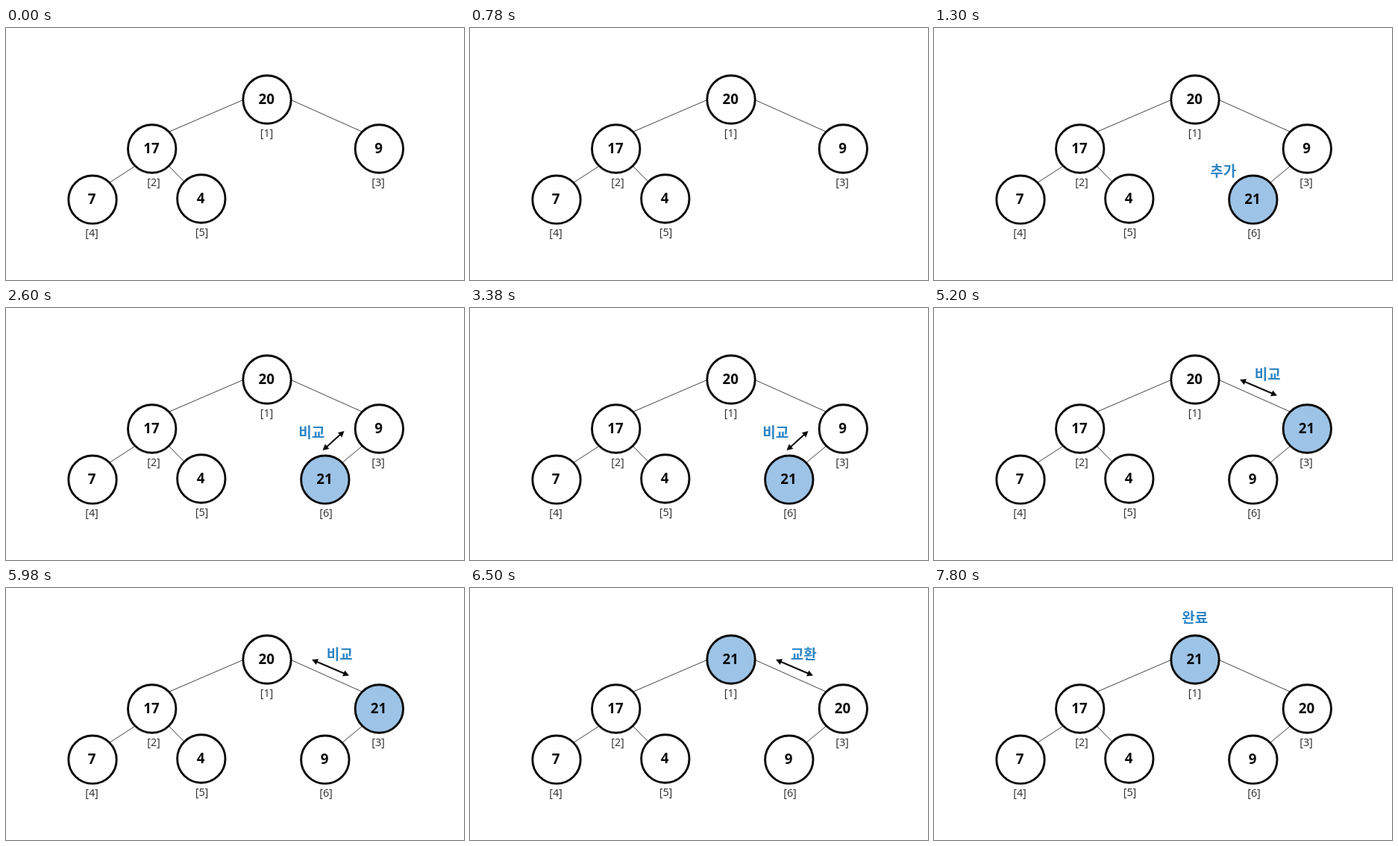
Recreate the animation shown at these times as an HTML page with a canvas. Size 614 px wide and 338 px high, loop 8 s.

```html
<!DOCTYPE html>
<html lang="ko">
<head>
<meta charset="utf-8">
<style>
html, body { margin: 0; width: 100%; height: 100%; overflow: hidden; background: #fff; }
canvas { display: block; width: 614px; height: 338px; }
</style>
</head>
<body>
<canvas></canvas>
<script>
const canvas = document.querySelector('canvas');
const ctx = canvas.getContext('2d');
const scale = window.devicePixelRatio || 1;
canvas.width = 614 * scale;
canvas.height = 338 * scale;
ctx.scale(scale, scale);
ctx.textAlign = 'center';

const STEP = 1300, LOOP = 8000, RADIUS = 32.2;
const INK = '#0a0a0a', BLUE = '#2e86c6';
const LATIN = '"Open Sans", "Noto Sans", sans-serif';
const HANGUL = '"Noto Sans CJK KR", "Noto Sans CJK", sans-serif';

// Circle centre and label x of each heap slot
const nodes = [
  [350, 96, 349.5], [195.7, 162, 198], [500.3, 162, 499],
  [116, 230.2, 115], [261.8, 229, 262.5], [427.8, 230.2, 429]
];
// Arrow ends and note position beside the edge above a slot
const hints = {
  5: { arrow: [424.5, 191, 453.5, 165], note: [410, 167] },
  2: { arrow: [410, 96, 460, 117.5], note: [447.5, 89] }
};

const parentOf = i => (i - 1) >> 1;

// Insert a value and record every step while it sifts up
function insertSteps(heap, value) {
  const steps = [{ heap: [...heap] }];
  let active = heap.push(value) - 1;
  const record = (word, { note, arrow }) =>
    steps.push({ heap: [...heap], active, word, note, arrow });

  record('추가', { note: [388, 192] });
  while (active > 0 && heap[active] > heap[parentOf(active)]) {
    const hint = hints[active], parent = parentOf(active);
    record('비교', hint);
    [heap[active], heap[parent]] = [heap[parent], heap[active]];
    active = parent;
    record('교환', hint);
  }
  record('완료', { note: [350, 39.5] });
  return steps;
}

function line(x1, y1, x2, y2, width, color) {
  ctx.beginPath();
  ctx.moveTo(x1, y1);
  ctx.lineTo(x2, y2);
  ctx.lineWidth = width;
  ctx.strokeStyle = color;
  ctx.stroke();
}

function text(value, x, y, font, color) {
  ctx.font = font;
  ctx.fillStyle = color;
  ctx.fillText(value, x, y);
}

// Edges leave the root sideways, other nodes diagonally
function drawEdge(child) {
  const parent = parentOf(child);
  const [px, py] = nodes[parent], [cx, cy] = nodes[child];
  const side = Math.sign(cx - px);
  const angle = parent ? Math.PI / 4 : 0;
  const diagonal = RADIUS * Math.SQRT1_2;
  line(px + side * RADIUS * Math.cos(angle), py + 0.5 + RADIUS * Math.sin(angle),
    cx - side * diagonal, cy - diagonal, 1, '#444');
}

function drawNode(value, i, active) {
  const [x, y, labelX] = nodes[i];
  ctx.beginPath();
  ctx.arc(x, y, RADIUS, 0, 2 * Math.PI);
  ctx.fillStyle = active ? '#9dc3e6' : '#fff';
  ctx.fill();
  ctx.lineWidth = 2.9;
  ctx.strokeStyle = INK;
  ctx.stroke();
  text(value, x - 0.8, y + 6, `700 18.7px ${LATIN}`, INK);
  text(`[${i + 1}]`, labelX, y + 50, `400 14.4px ${LATIN}`, '#2a2a2a');
}

function arrowHead(x, y, angle) {
  ctx.save();
  ctx.translate(x, y);
  ctx.rotate(angle);
  ctx.beginPath();
  ctx.moveTo(0, 0);
  ctx.lineTo(-8, -4.2);
  ctx.lineTo(-8, 4.2);
  ctx.fillStyle = INK;
  ctx.fill();
  ctx.restore();
}

function doubleArrow(x1, y1, x2, y2) {
  const angle = Math.atan2(y2 - y1, x2 - x1);
  const dx = 5 * Math.cos(angle), dy = 5 * Math.sin(angle);
  line(x1 + dx, y1 + dy, x2 - dx, y2 - dy, 2, INK);
  arrowHead(x1, y1, angle + Math.PI);
  arrowHead(x2, y2, angle);
}

function draw({ heap, active, word, note, arrow }) {
  ctx.clearRect(0, 0, 614, 338);
  heap.forEach((_, i) => i && drawEdge(i));
  heap.forEach((value, i) => drawNode(value, i, i === active));
  if (arrow) doubleArrow(...arrow);
  if (word) text(word, note[0] - 0.3, note[1] + 7, `700 19px ${HANGUL}`, BLUE);
}

const steps = insertSteps([20, 17, 9, 7, 4], 21);

function tick() {
  draw(steps[Math.floor(performance.now() % LOOP / STEP)]);
  requestAnimationFrame(tick);
}
tick();
</script>
</body>
</html>
```
